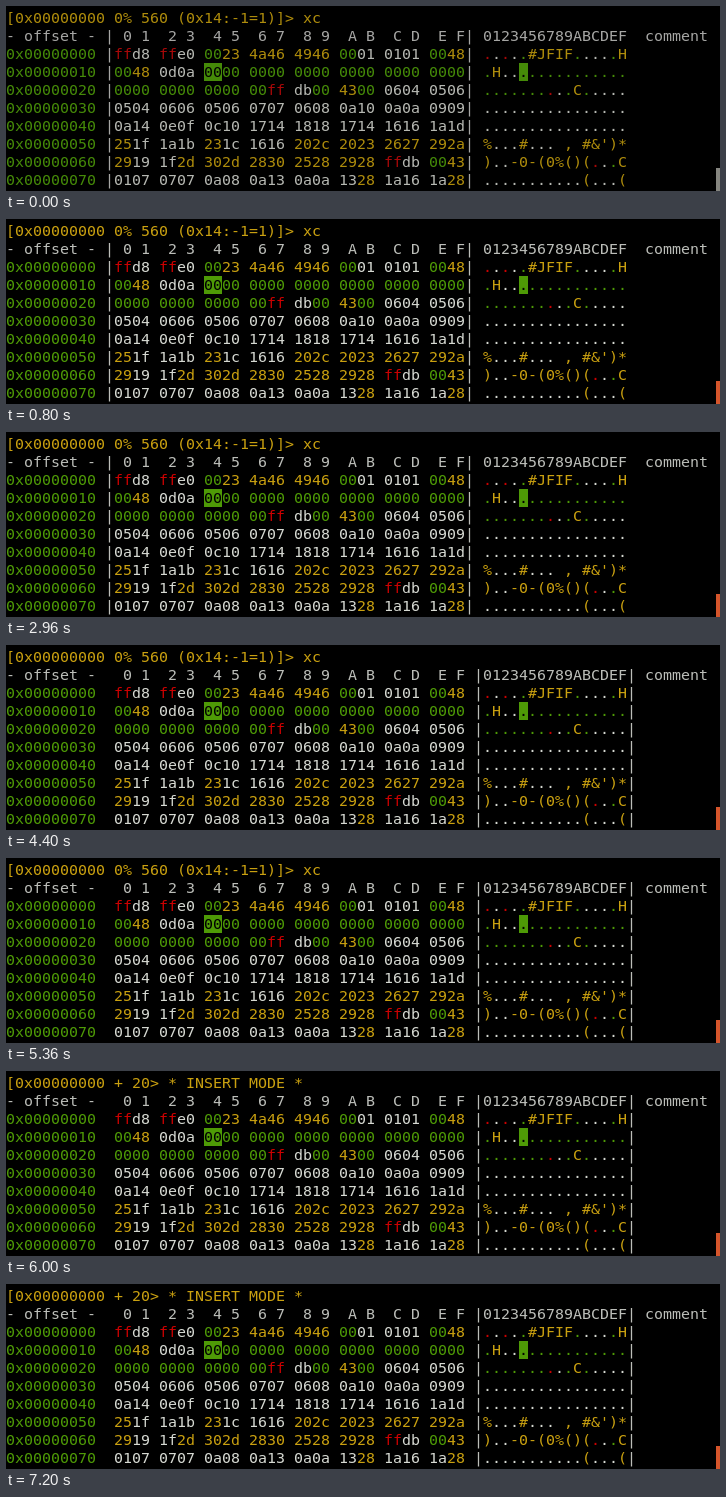
An HTML page that plays this animation: 714x185 px, repeating every 8 s.

```html
<!DOCTYPE html>
<html lang="en">
<head>
<meta charset="utf-8">
<title>Hex view</title>
<style>
  html, body { margin: 0; width: 100%; height: 100%; overflow: hidden; background: #000; }
  #term {
    position: relative; width: 714px; height: 185px; overflow: hidden; background: #000;
    font: 14.95px/18px "DejaVu Sans Mono", monospace;
    font-variant-ligatures: none;
  }
  #term span { position: absolute; height: 18px; white-space: pre; }
  .head   { color: var(--head); }
  .plain  { color: var(--plain); }
  .zero   { color: var(--green); }
  .print  { color: var(--yellow); }
  .full   { color: var(--red); }
  .cursor { color: #000; background: var(--green); }
  #thumb  { position: absolute; left: 710px; top: 162px; width: 4px; height: 23px; background: var(--thumb); }
</style>
</head>
<body>
<div id="term"><div id="thumb"></div></div>
<script>
const LOOP = 8000, CELL = 9, LINE = 18, TOP = 3;
const HEX_COL = 12, ASCII_COL = 53, CURSOR = 0x14;
const term = document.getElementById('term');

const dump = [
  'ffd8 ffe0 0023 4a46 4946 0001 0101 0048',
  '0048 0d0a 0000 0000 0000 0000 0000 0000',
  '0000 0000 0000 00ff db00 4300 0604 0506',
  '0504 0606 0506 0707 0608 0a10 0a0a 0909',
  '0a14 0e0f 0c10 1714 1818 1714 1616 1a1d',
  '251f 1a1b 231c 1616 202c 2023 2627 292a',
  '2919 1f2d 302d 2830 2528 2928 ffdb 0043',
  '0107 0707 0a08 0a13 0a0a 1328 1a16 1a28'
];

const dim = {
  '--head': '#a6a6a4', '--plain': '#b6b8b2', '--green': '#458a08',
  '--yellow': '#ae8c0c', '--red': '#a80808', '--thumb': '#85857f'
};
const bright = {
  '--head': '#bcbeb9', '--plain': '#d6d9d2', '--green': '#4e9a06',
  '--yellow': '#c9a010', '--red': '#cc0000', '--thumb': '#d5552b'
};

function put(parent, row, col, text, cls) {
  const s = document.createElement('span');
  s.className = cls;
  s.textContent = text;
  s.style.left = col * CELL + 'px';
  s.style.top = TOP + row * LINE + 'px';
  s.style.width = text.length * CELL + 'px';
  parent.append(s);
}

function layer() {
  return term.appendChild(document.createElement('div'));
}

// Hold each state until the next listed time.
function hold(el, steps) {
  const frames = steps.map(([ms, props]) => ({ ...props, offset: ms / LOOP, easing: 'step-end' }));
  frames.push({ ...steps[steps.length - 1][1], offset: 1 });
  el.animate(frames, { duration: LOOP, iterations: Infinity });
}

function swap(before, after, ms) {
  hold(before, [[0, { visibility: 'visible' }], [ms, { visibility: 'hidden' }]]);
  hold(after, [[0, { visibility: 'hidden' }], [ms, { visibility: 'visible' }]]);
}

function title(text) {
  const box = layer();
  [...text].forEach((c, i) => c !== ' ' && put(box, 0, i, c, 'print'));
  return box;
}

function bars(...cols) {
  const box = layer();
  for (let row = 1; row <= dump.length + 1; row++)
    for (const col of cols) put(box, row, col, '|', 'head');
  return box;
}

function kind(byte, index) {
  if (index === CURSOR) return 'cursor';
  if (byte === 0) return 'zero';
  if (byte === 255) return 'full';
  return byte >= 32 && byte < 127 ? 'print' : 'plain';
}

put(term, 1, 0, '- offset -', 'head');
put(term, 1, 71, 'comment', 'head');
for (let i = 0; i < 16; i++) {
  const digit = i.toString(16).toUpperCase();
  put(term, 1, HEX_COL + 1 + (i >> 1) * 5 + (i & 1) * 2, digit, 'head');
  put(term, 1, ASCII_COL + i, digit, 'head');
}

dump.forEach((line, r) => {
  const row = r + 2;
  put(term, row, 0, '0x' + (r * 16).toString(16).padStart(8, '0'), 'zero');
  line.replace(/ /g, '').match(/../g).forEach((hex, i) => {
    const byte = parseInt(hex, 16), cls = kind(byte, r * 16 + i);
    const char = byte >= 32 && byte < 127 ? String.fromCharCode(byte) : '.';
    put(term, row, HEX_COL + (i >> 1) * 5 + (i & 1) * 2, hex, cls);
    put(term, row, ASCII_COL + i, char, cls);
  });
});

hold(term, [[0, dim], [800, bright]]);
swap(bars(11, 51), bars(52, 69), 4400);
swap(title('[0x00000000 0% 560 (0x14:-1=1)]> xc'), title('[0x00000000 + 20> * INSERT MODE *'), 6000);
</script>
</body>
</html>
```
